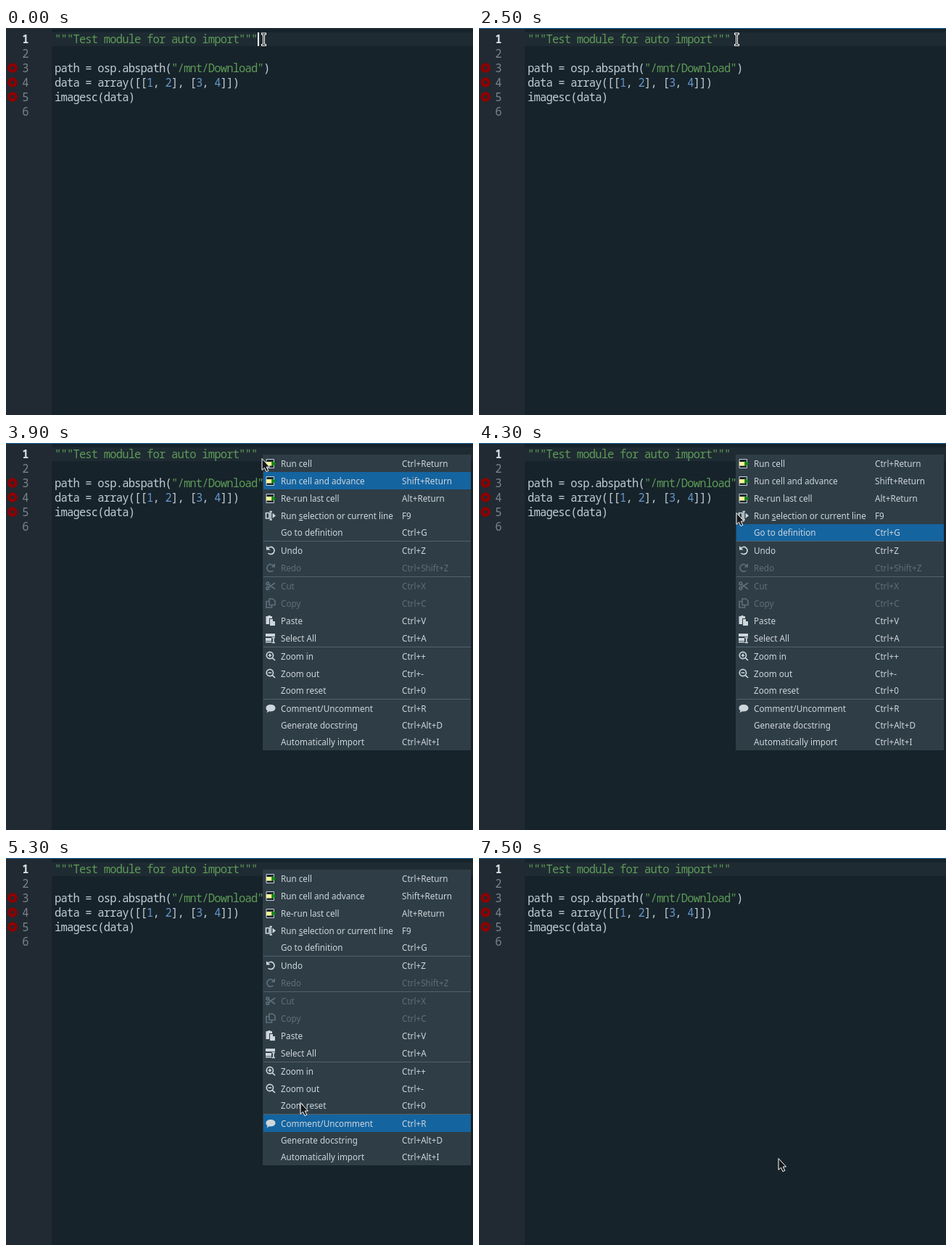
Recreate the animation shown at these times as an HTML page. Size 644 by 534 pixels, loop 8 s.

```html
<!DOCTYPE html>
<html lang="en">
<head>
<meta charset="utf-8">
<title>Editor context menu</title>
<style>
  html, body { margin: 0; width: 100%; height: 100%; overflow: hidden; background: #17232a; }
  svg { display: block; }
  text { white-space: pre; }
  .code {
    font: 15.5px "Noto Sans Mono", "DejaVu Sans Mono", monospace;
    font-stretch: semi-condensed;
    letter-spacing: calc(8.47px - 1ch);
    fill: #c0cdd6;
  }
  .str { fill: #5d9a58; }
  .num { fill: #6496cc; }
  .line { fill: #7b848a; }
  .current { fill: #d5dce2; font-weight: bold; }
  .menu { font: 11.7px "Noto Sans", "Open Sans", sans-serif; color: #cdd6dc; }
  .menu text { fill: currentColor; }
  .off { color: #5f6e78; }
  .mnemonic { text-decoration: underline; text-underline-offset: 2px; }
  .fill { fill: currentColor; }
  .stroke { fill: none; stroke: currentColor; stroke-width: 1.7; }
</style>
</head>
<body>
<svg width="644" height="534" viewBox="0 0 644 534">
  <rect width="644" height="534" fill="#17232a"/>
  <rect x="63" y="6" width="581" height="19" fill="#1f2b32"/>
  <rect width="63" height="534" fill="#212a32"/>
  <rect id="focus" width="644" height="1"/>
  <g id="editor"></g>
  <rect id="caret" x="347" y="6" width="2" height="19" fill="#f4f6f7"/>
  <g id="menu" class="menu">
    <rect x="354" y="16" width="287" height="408" fill="#2f3d46"/>
    <rect id="highlight" x="355" width="286" fill="#1464a0"/>
  </g>
  <g id="beam" fill="none">
    <path d="M352 8h7M355.5 8v15.5M352 23.5h7" stroke="#fff" stroke-width="3"/>
    <path d="M353 8h5M355.5 8v15.5M353 23.5h5" stroke="#15191c"/>
  </g>
  <path id="pointer" d="M0-.5V15.3L3.5 12.2L6 17.6L8.8 16.3L6.3 11H10.5Z"
        fill="#15191c" stroke="#fff" stroke-linejoin="round"/>
</svg>
<script>
const $ = id => document.getElementById(id);
const LOOP = 8000, STEP = 100, MENU_OPEN = 2600, HOVER = 3700, MENU_CLOSE = 7500;

const span = (cls, s) => `<tspan class="${cls}">${s}</tspan>`;
const str = s => span('str', s), num = s => span('num', s);
const lines = [
  str('"""Test module for auto import"""'),
  '',
  `path = osp.abspath(${str('"/mnt/Download"')})`,
  `data = array([[${num(1)}, ${num(2)}], [${num(3)}, ${num(4)}]])`,
  'imagesc(data)',
  ''
];
$('editor').innerHTML = lines.map((code, i) => {
  const y = 21 + 20 * i;
  const error = i > 1 && i < 5
    ? `<circle cx="9" cy="${y - 6}" r="4.6" fill="none" stroke="#8f0000" stroke-width="4.2"/>`
    : '';
  return `${error}<text class="code ${i ? 'line' : 'current'}" x="22.3" y="${y}">${i + 1}</text>
    <text class="code" x="67" y="${y}">${code}</text>`;
}).join('');

// Icons live in a 16 by 16 box.
const fill = d => `<path class="fill" d="${d}"/>`;
const stroke = d => `<path class="stroke" d="${d}"/>`;
const cell = `<path d="M2 2.5H12.5V14.5H2Z" fill="#19232d" stroke="#c9d3da"/>
  <path d="M2 6H9.5V11.5H2Z" fill="#fdf59a"/><path d="M9.5 4.5L15.5 8.5L9.5 12.5Z" fill="#0c8a12"/>`;
const turn = stroke('M4 5.5A5 5 0 1 1 4.5 12') + fill('M2 2V7.5H7.5Z');
const lens = stroke('M11.5 7A4.6 4.6 0 1 1 2.3 7A4.6 4.6 0 1 1 11.5 7M10.2 10.3L14 14M4.7 7H9.1');
const icons = {
  cell,
  selection: stroke('M1.5 4.5H6V12H1.5ZM6.5 2.5H10M8.2 2.5V14M6.5 14H10') + fill('M10.5 4.5L15 8.3L10.5 12Z'),
  undo: turn,
  redo: `<g transform="translate(16)scale(-1 1)">${turn}</g>`,
  cut: stroke('M5.5 6.5L14 12.5M5.5 10L14 4M5.6 5A1.8 1.8 0 1 1 2 5A1.8 1.8 0 1 1 5.6 5M5.6 11.5A1.8 1.8 0 1 1 2 11.5A1.8 1.8 0 1 1 5.6 11.5'),
  copy: stroke('M6 2H11L14 5V10.5H6ZM6 5.5H2V14H9.5V10.5'),
  paste: fill('M1.5 2H4L5 1H7L8 2H10V5H6V13H1.5ZM7 6H11V9H14V15H7Z'),
  all: fill('M1 2H14V6H1ZM1 8H9V12H1Z') + stroke('M1 13.7H9M9.5 7.5H14M11.8 7.5V14.5M9.5 14.5H14'),
  zoomIn: lens + stroke('M6.9 4.8V9.2'),
  zoomOut: lens,
  comment: fill('M8 3C12 3 14.5 5 14.5 7.7C14.5 10.4 12 12.4 8 12.4L6 12.2L2.5 14.2L3.5 11.2C2 10.3 1.5 9 1.5 7.7C1.5 5 4 3 8 3Z')
};

const entries = [
  ['Run cell', 'Ctrl+Return', 'cell'],
  ['Run cell and advance', 'Shift+Return', 'cell'],
  ['Re-run last cell', 'Alt+Return', 'cell'],
  [`Run ${span('mnemonic', 's')}election or current line`, 'F9', 'selection'],
  ['Go to definition', 'Ctrl+G'],
  null,
  ['Undo', 'Ctrl+Z', 'undo'],
  ['Redo', 'Ctrl+Shift+Z', 'redo', true],
  null,
  ['Cut', 'Ctrl+X', 'cut', true],
  ['Copy', 'Ctrl+C', 'copy', true],
  ['Paste', 'Ctrl+V', 'paste'],
  ['Select All', 'Ctrl+A', 'all'],
  null,
  ['Zoom in', 'Ctrl++', 'zoomIn'],
  ['Zoom out', 'Ctrl+-', 'zoomOut'],
  ['Zoom reset', 'Ctrl+0'],
  null,
  ['Comment/Uncomment', 'Ctrl+R', 'comment'],
  ['Generate docstring', 'Ctrl+Alt+D'],
  ['Automatically import', 'Ctrl+Alt+I']
];
const rows = [];
let rowTop = 16, menuMarkup = '';
for (const entry of entries) {
  if (!entry) {
    menuMarkup += `<rect x="355" y="${rowTop}" width="286" height="1" fill="#51616b"/>`;
    rowTop++;
    continue;
  }
  const [label, keys, icon, disabled] = entry;
  const height = icon ? 24 : 23, base = rowTop + (icon ? 17 : 16);
  menuMarkup += `<g class="${disabled ? 'off' : ''}">
    <g transform="translate(357 ${rowTop + 4})">${icons[icon] || ''}</g>
    <text x="379" y="${base}">${label}</text><text x="546" y="${base}">${keys}</text></g>`;
  rows.push({ top: rowTop, height, disabled });
  rowTop += height;
}
$('menu').insertAdjacentHTML('beforeend', menuMarkup);

// Pointer path: time, x, y
const path = [
  [3600, 355, 15], [3700, 356, 18], [3800, 356, 18], [3900, 353, 22], [4300, 355, 97],
  [4700, 375, 205], [4900, 387, 243], [5600, 420, 410], [5700, 413, 415]
];
function pointerAt(t) {
  const next = path.findIndex(p => p[0] >= t);
  if (next < 0) return path[path.length - 1].slice(1);
  if (next === 0) return path[0].slice(1);
  const [t0, x0, y0] = path[next - 1], [t1, x1, y1] = path[next];
  const k = (t - t0) / (t1 - t0);
  return [x0 + (x1 - x0) * k, y0 + (y1 - y0) * k];
}

const show = (id, on) => $(id).setAttribute('visibility', on ? 'inherit' : 'hidden');

function draw(time) {
  const t = Math.floor(time % LOOP / STEP) * STEP;
  const open = t >= MENU_OPEN && t < MENU_CLOSE;
  $('focus').setAttribute('fill', t < 500 ? '#2a3640' : '#1a6ba8');
  show('caret', t < 2500 && t % 1000 < 500);
  show('beam', t < MENU_OPEN);
  show('menu', open);
  show('pointer', t >= MENU_OPEN);

  const [x, y] = pointerAt(t).map(Math.round);
  $('pointer').setAttribute('transform', `translate(${x} ${y})`);

  // The highlight runs one step ahead of the drawn pointer.
  const aim = pointerAt(t + STEP)[1];
  const row = rows.find(r => aim >= r.top && aim < r.top + r.height);
  const lit = open && t >= HOVER && row && !row.disabled;
  show('highlight', lit);
  if (lit) {
    $('highlight').setAttribute('y', row.top);
    $('highlight').setAttribute('height', row.height);
  }
}

const start = performance.now();
function tick() {
  draw(performance.now() - start);
  requestAnimationFrame(tick);
}
tick();
</script>
</body>
</html>
```
